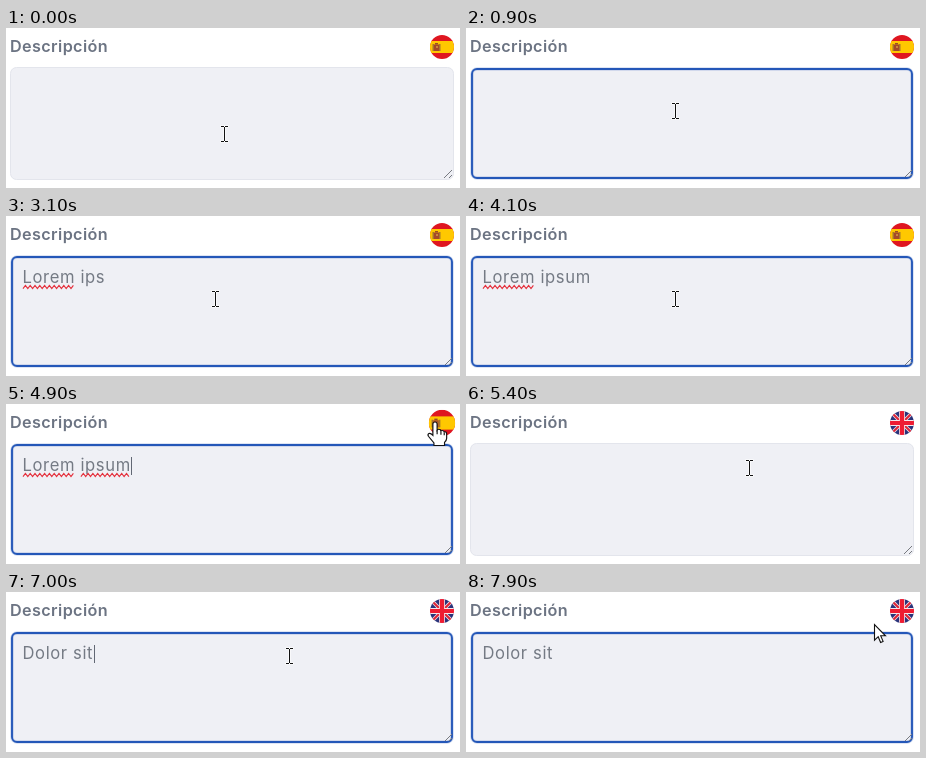
Write an HTML page with a canvas that moves like this. It is 454 by 160 pixels and loops after 8 s.

```html
<!DOCTYPE html>
<html lang="es">
<head>
<meta charset="utf-8">
<title>Descripción</title>
<style>
html, body { margin: 0; width: 100%; height: 100%; overflow: hidden; background: #fff; }
canvas { display: block; width: 454px; height: 160px; }
</style>
</head>
<body>
<canvas id="stage"></canvas>
<script>
const LOOP = 8000, STEP = 100, W = 454, H = 160;
const canvas = document.getElementById('stage');
const ctx = canvas.getContext('2d');
const dpr = window.devicePixelRatio || 1;
canvas.width = W * dpr;
canvas.height = H * dpr;

const FONT = 'Inter, "Open Sans", sans-serif';
const TEXT_X = 17, BASELINE = 67;
const FLAG = { x: 436, y: 19, r: 12 };
const SWITCH = 5200;

// Each entry: time and the text typed so far
const typing = [
  [400, ''], [1200, 'L'], [1300, 'Lo'], [1400, 'Lor'], [1500, 'Lore'], [1600, 'Lorem'],
  [1700, 'Lorem '], [1900, 'Lorem i'], [2000, 'Lorem ip'], [2300, 'Lorem ips'],
  [3300, 'Lorem ipsu'], [3600, 'Lorem ipsum'], [SWITCH, ''], [5500, ''],
  [5900, 'D'], [6200, 'Do'], [6300, 'Dol'], [6500, 'Dolo'], [6600, 'Dolor'],
  [6700, 'Dolor '], [6800, 'Dolor s'], [6900, 'Dolor si'], [7000, 'Dolor sit']
];

// Pointer moves: start, end, from, to
const moves = [
  [0, 200, 218, 106, 209, 83],
  [4100, 4800, 209, 83, 429, 18],
  [5100, 5400, 429, 18, 283, 64],
  [7500, 7900, 283, 64, 408, 32]
];

const handShape = new Path2D('M-2 2Q-2 0 0 0Q2 0 2 2V8Q3 6.5 5 7.5L5.6 8.7Q7.5 7.6 8.7 9.6Q11 9 11 12V16Q11 18 9 20V23H-1V20.5L-6.2 14Q-7.2 12 -5.8 11.2Q-4 10.7 -2 13Z');
const handLines = new Path2D('M2 8V12M5.6 9V12.5M8.7 10V13');
const arrowShape = new Path2D('M.5 .5V16.2L4.2 12.7L6.6 18.5L9.1 17.4L6.7 11.8H11.5Z');

const clamp = v => Math.max(0, Math.min(1, v));
const ramp = (t, a, b) => clamp((t - a) / (b - a));
const ease = v => v * v * (3 - 2 * v);

function rect(color, x, y, w, h) {
  ctx.fillStyle = color;
  ctx.fillRect(x, y, w, h);
}

function line(color, width, ...points) {
  ctx.strokeStyle = color;
  ctx.lineWidth = width;
  ctx.beginPath();
  points.forEach(([x, y]) => ctx.lineTo(x, y));
  ctx.stroke();
}

function panel(x, y, w, h, r, ...strokes) {
  ctx.beginPath();
  ctx.roundRect(x, y, w, h, r);
  ctx.fillStyle = '#eff0f5';
  ctx.fill();
  for (const [color, width] of strokes) {
    ctx.strokeStyle = color;
    ctx.lineWidth = width;
    ctx.stroke();
  }
}

function setFont(weight, size, spacing) {
  ctx.font = `${weight} ${size}px ${FONT}`;
  ctx.letterSpacing = spacing + 'px';
}

function pointerAt(t) {
  let [, , , , x, y] = moves[moves.length - 1];
  for (const [start, end, x0, y0, x1, y1] of moves) {
    if (t < start) { x = x0; y = y0; break; }
    if (t <= end) {
      const k = ease(ramp(t, start, end));
      x = x0 + (x1 - x0) * k;
      y = y0 + (y1 - y0) * k;
      break;
    }
  }
  const onFlag = Math.hypot(x - FLAG.x, y - FLAG.y) < FLAG.r + 1;
  return { x: Math.round(x), y: Math.round(y), kind: onFlag ? 'hand' : y > 39 ? 'beam' : 'arrow' };
}

function drawField(focus) {
  panel(4.5, 39.5, 443, 112, 6, ['#e3e5ec', 1]);
  if (focus > 0) {
    ctx.globalAlpha = focus;
    rect('#fff', 3, 38, 446, 115);
    panel(6, 41, 440, 109, 5, ['#2457b833', 3.6], ['#2457b8', 1.9]);
    ctx.globalAlpha = 1;
  }
  const s = focus > 0.5 ? 1 : 0;
  line('#777a80', 1, [438 + s, 150 - s], [446, 142]);
  line('#777a80', 1, [443, 150 - s], [446, 147 - s]);
}

function squiggle(x, w) {
  const points = [];
  for (let i = 0; i * 2.4 <= w; i++) points.push([x + i * 2.4, i % 2 ? 69.4 : 72.6]);
  line('#e5323e', 1.2, ...points);
}

function drawText(t) {
  const [since, text] = typing.filter(e => e[0] <= t).pop() || [0, ''];
  setFont(400, 16.6, 0.62);
  ctx.fillStyle = '#747a84';
  ctx.fillText(text, TEXT_X - 0.5, BASELINE);
  const width = s => ctx.measureText(s).width;
  if (t >= 1900 && t < SWITCH) squiggle(TEXT_X, width('Lorem'));
  if (t >= 4300 && t < SWITCH) squiggle(TEXT_X + width('Lorem '), width('ipsum'));
  const focused = (t >= 400 && t < 5100) || t >= 5500;
  if (focused && (t - since) % 1000 < 500) {
    rect('#626874', Math.round(TEXT_X + width(text)), 53, 1, 18);
  }
}

function spain() {
  rect('#df1620', -12, -12, 24, 24);
  rect('#ffc800', -12, -6, 24, 12);
  rect('#a6762c', -9.5, -3, 1.5, 7);
  rect('#a6762c', -3, -3, 1.5, 7);
  rect('#a5482a', -8, -2.5, 5, 6.5);
  rect('#c9883a', -6, -1, 2, 2);
  rect('#9c4a25', -7, -4, 3, 1.5);
}

function britain() {
  rect('#29337a', -12, -12, 24, 24);
  for (const [color, width] of [['#f3e3ea', 3.6], ['#df2436', 2]]) {
    line(color, width, [-12, -12], [12, 12]);
    line(color, width, [-12, 12], [12, -12]);
  }
  for (const [color, width] of [['#f7e6ea', 5.8], ['#ee1c32', 4.2]]) {
    line(color, width, [-12, 0], [12, 0]);
    line(color, width, [0, -12], [0, 12]);
  }
}

function drawFlag(t) {
  const hover = ramp(t, 4500, 4900) - ramp(t, 5100, 5300);
  ctx.save();
  ctx.translate(FLAG.x, FLAG.y);
  ctx.scale(1 + hover * 0.1, 1 + hover * 0.1);
  ctx.beginPath();
  ctx.arc(0, 0, FLAG.r, 0, Math.PI * 2);
  ctx.clip();
  (t < SWITCH ? spain : britain)();
  ctx.restore();
}

function beam() {
  for (const [color, grow] of [['#fff', 0.6], ['#111', 0]]) {
    const bar = (x, y, w, h) => rect(color, x - grow, y - grow, w + 2 * grow, h + 2 * grow);
    bar(0, -7, 1, 14);
    for (const y of [-8, 7]) {
      bar(-3, y, 3, 1);
      bar(1, y, 3, 1);
    }
  }
}

function outline(shape) {
  ctx.fillStyle = '#fff';
  ctx.fill(shape);
  ctx.strokeStyle = '#111';
  ctx.lineWidth = 1.1;
  ctx.stroke(shape);
}

function hand() {
  ctx.scale(1.06, 1.02);
  outline(handShape);
  ctx.stroke(handLines);
}

const pointers = { beam, hand, arrow: () => outline(arrowShape) };

function draw(t) {
  ctx.setTransform(dpr, 0, 0, dpr, 0, 0);
  rect('#fff', 0, 0, W, H);
  setFont(600, 16.2, 0.38);
  ctx.fillStyle = '#6c7483';
  ctx.fillText('Descripción', 4, 24);
  drawField(ramp(t, 200, 400) - ramp(t, 5050, 5250) + ramp(t, 5400, 5600));
  drawText(t);
  drawFlag(t);
  const p = pointerAt(t);
  ctx.translate(p.x, p.y);
  pointers[p.kind]();
}

const start = performance.now();
function tick() {
  const t = (performance.now() - start) % LOOP;
  draw(Math.floor(t / STEP) * STEP);
  requestAnimationFrame(tick);
}
tick();
</script>
</body>
</html>
```
